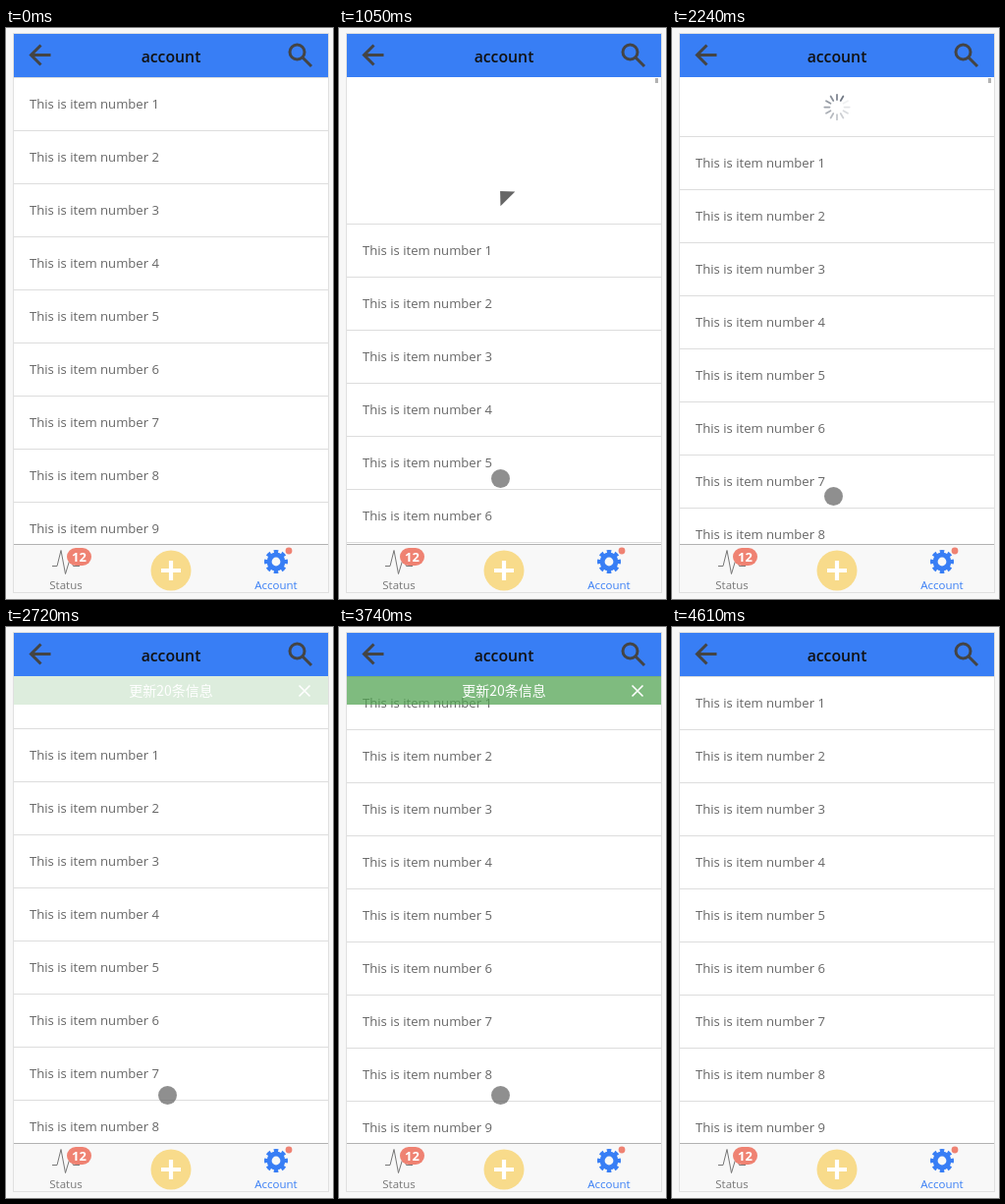
Recreate the animation shown at these times as an HTML page. Size 333 by 581 pixels, loop 6.08 s.

```html
<!DOCTYPE html>
<html lang="en">
<head>
<meta charset="utf-8">
<title>Pull to refresh</title>
<style>
  html, body { margin: 0; width: 100%; height: 100%; overflow: hidden; background: #f7f7f7; }
  svg { display: block; }
  text { font-family: "Open Sans", "Noto Sans", sans-serif; }
  .mid { text-anchor: middle; }
  .item text { font-size: 13.1px; fill: #666; }
  .tab { font-size: 11.5px; }
  .line { fill: none; stroke: #444; stroke-width: 3; }
  #toast text { font: 14px "Noto Sans CJK SC", "Noto Sans CJK", sans-serif; fill: #fff; }
</style>
</head>
<body>
<svg width="333" height="581" viewBox="0 0 333 581">
  <rect x="7.5" y="5.5" width="321" height="569" fill="#fff" stroke="#e0e0e0"/>

  <svg x="8" y="50" width="320" height="475">
    <g id="list"></g>
    <path id="arrow" d="M-10.5-5.5H10.5L0 5.5Z" fill="#666"/>
    <g id="spinner" stroke="#69717d" stroke-width="1.75" stroke-linecap="round"></g>
    <rect id="bar" x="314" y="1" width="3" height="5" fill="#b2b2b2"/>
    <g id="toast">
      <rect width="320" height="29" fill="#51a351"/>
      <text class="mid" x="160" y="19.5">更新20条信息</text>
      <path d="M290.5 9.5l11 11m0-11l-11 11" stroke="#fff" stroke-width="1.6"/>
    </g>
  </svg>

  <rect x="8" y="6" width="320" height="44" fill="#387ef5"/>
  <path class="line" d="M45.5 27.5H26M35.5 17.5L25.5 27.5L35.5 37.5"/>
  <text class="mid" x="168" y="34.5" font-size="15.8" font-weight="600" fill="#111">account</text>
  <circle class="line" cx="296.5" cy="24.5" r="7.5"/>
  <path class="line" stroke-width="4" d="M301.5 29.5L311 39"/>

  <rect x="8" y="525" width="320" height="49" fill="#f8f8f8"/>
  <rect x="8" y="525" width="320" height="1" fill="#b2b2b2"/>
  <path d="M47 547.5H52L56 531.5L60.5 555.5L65.5 539L68.5 547.5H75" fill="none" stroke="#777"/>
  <rect x="62" y="529" width="25" height="18" rx="9" fill="#ef8272"/>
  <text class="mid" x="74.5" y="543" font-size="13" font-weight="700" fill="#fff">12</text>
  <text class="tab mid" x="61" y="571" fill="#777">Status</text>
  <circle cx="168" cy="552" r="20.5" fill="#f8db8b"/>
  <path d="M158 552H178M168 542V562" stroke="#fff" stroke-width="4.2"/>
  <g transform="translate(275 543)" fill="none" stroke="#387ef5">
    <circle r="6.9" stroke-width="5"/>
    <circle r="10.2" stroke-width="3.6" pathLength="80" stroke-dasharray="5.6 4.4" stroke-dashoffset="2.8"/>
  </g>
  <circle cx="288" cy="532" r="3.4" fill="#ef8272"/>
  <text class="tab mid" x="275" y="571" fill="#387ef5">Account</text>

  <circle id="touch" r="9.5" fill="#606060" fill-opacity=".7"/>
</svg>
<script>
const $ = id => document.getElementById(id);
const LOOP = 6080, STEP = 80;
// spans in which the picture advances; it rests between them
const spans = [[90, 1130], [1520, 3040], [3740, 4060], [4370, 4610]];
// time, x, y of the touch point
const path = [
  [90, 251, 572], [250, 222, 450], [410, 190, 270], [570, 171, 165],
  [650, 168.5, 150.5], [730, 168.5, 168.5], [810, 167, 225], [890, 166, 310],
  [970, 165, 395], [1050, 164.5, 458.5], [1130, 164.5, 476.5],
  [4290, 164.5, 476.5], [4370, 176, 484], [4450, 214, 515], [4530, 265.5, 564.5]
];

let rows = '', spokes = '';
for (let i = 0; i < 10; i++) {
  const y = i * 54;
  rows += `<g class="item"><rect y="${y}" width="320" height="1" fill="#ddd"/>` +
    `<text x="16" y="${y + 32}">This is item number ${i + 1}</text></g>`;
}
for (let i = 0; i < 12; i++) spokes += `<path d="M0-7.5V-12.7" transform="rotate(${i * 30})"/>`;
$('list').innerHTML = rows;
$('spinner').innerHTML = spokes;

const ramp = (t, from, to) => Math.min(1, Math.max(0, (t - from) / (to - from)));
const easeOut = p => 1 - (1 - p) ** 3;
const show = (id, on) => $(id).setAttribute('visibility', on ? 'visible' : 'hidden');
const place = (id, x, y, turn = 0) =>
  $(id).setAttribute('transform', `translate(${x} ${y}) rotate(${turn})`);

function snap(t) {
  const span = spans.filter(s => s[0] <= t).pop();
  return span ? Math.min(span[1], span[0] + STEP * Math.floor((t - span[0]) / STEP)) : 0;
}

function touchAt(t) {
  const i = path.findIndex(p => p[0] >= t);
  if (i < 1) return path[i < 0 ? path.length - 1 : 0].slice(1);
  const a = path[i - 1], b = path[i], k = ramp(t, a[0], b[0]);
  return [1, 2].map(n => a[n] + (b[n] - a[n]) * k);
}

function pullAt(t, y) {
  if (t <= 730) return 0;
  if (t < 1500) return (y - 160) / 2;
  if (t < 2712) return 158 - 98 * easeOut(ramp(t, 1500, 1857));
  return 60 * (1 - easeOut(ramp(t, 2712, 2912)));
}

function draw(t) {
  const [x, y] = touchAt(t);
  const pull = Math.round(pullAt(t, y));
  place('touch', x, y);
  show('touch', t >= 90 && t < 4610);

  place('list', 0, pull);
  place('arrow', 160, pull - 29, 180 * ramp(t, 900, 1100));
  show('arrow', t > 730 && t < 1500);
  place('spinner', 160, pull - 29.5);
  show('spinner', t >= 1500 && t < 2712);
  const head = 7 + (t - 1680) * 0.012;
  [...$('spinner').children].forEach((spoke, i) => {
    const age = ((head - i) % 12 + 12) % 12;
    spoke.setAttribute('opacity', 1 - age / 13);
  });
  show('bar', t > 730 && t < 2712);

  const fade = ramp(t, 2640, 3000) * (1 - ramp(t, 3690, 4060));
  $('toast').setAttribute('opacity', 0.85 * fade);
}

function tick() {
  draw(snap(performance.now() % LOOP));
  requestAnimationFrame(tick);
}
tick();
</script>
</body>
</html>
```
